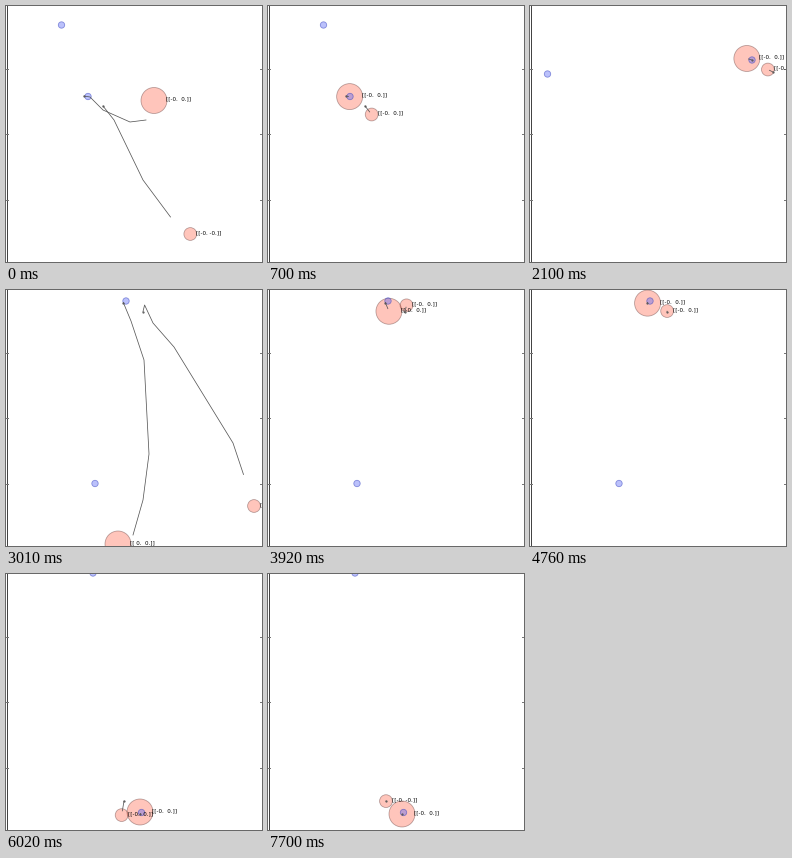
Write a matplotlib script that moves like this. It is 256 px wide and 256 px high and loops after 7.77 s.

```python
import numpy as np
import matplotlib.pyplot as plt
from matplotlib.animation import FuncAnimation
from matplotlib.patches import Circle

SIZE, DPI = 256, 100
FRAMES, INTERVAL = 111, 70
PX = 72 / DPI  # points per pixel
RADII = (13, 6.4)

STARTS = (0, 21, 43, 70)
GOALS = (
    [(55.5, 19), (82, 90.5)],
    [(17.5, 68), (222, 54)],
    [(120, 11), (89, 193.5)],
    [(87, -1), (135.5, 238.5)],
)
# Bends of each episode's path: step, x, y
BIG = (
    [(0, 148, 94.5), (1, 140, 114), (2, 124, 116), (4, 97, 104),
     (6, 84, 91), (8, 78, 90)],
    [(0, 128, 58.5), (1, 154, 51), (3, 195, 46), (6, 222, 54)],
    [(0, 112, 254), (1, 127, 245), (2, 137, 210), (3, 143, 164),
     (5, 138, 70), (7, 125, 31), (9, 117.3, 12.5)],
    [(0, 140, 42), (2, 141.5, 72), (5, 137, 190), (7, 134, 232),
     (9, 134, 240)],
)
SMALL = (
    [(0, 184.3, 228), (1, 164.5, 211), (3, 137, 174), (6, 108, 114),
     (8, 97, 100)],
    [(0, 164.3, 39.3), (1, 183, 42), (3, 216, 53), (6, 243, 66)],
    [(0, 248, 216), (2, 227, 153), (5, 168, 57), (6, 147, 33),
     (8, 138.6, 15), (9, 137, 21.5)],
    [(0, 128, 66), (7, 116, 222), (9, 115, 245), (10, 118, 227)],
)

fig = plt.figure(figsize=(SIZE / DPI, SIZE / DPI), dpi=DPI, facecolor="white")
ax = fig.add_axes([0, 0, 1, 1])
ax.set(xlim=(0, SIZE), ylim=(SIZE, 0))
ax.axis("off")

ax.plot([0.5, 0.5], [0, SIZE], color="#444444", lw=PX)
for y in (62.5, 127.5, 193.5):
    ax.plot([0, 2], [y, y], color="#777777", lw=PX)
    ax.plot([253.5, SIZE], [y, y], color="#777777", lw=PX)


def disc(radius, fill, edge, z):
    return ax.add_patch(Circle((0, 0), radius, facecolor=fill, edgecolor=edge,
                               lw=0.8 * PX, zorder=z))


agents = [disc(r, (1, 0.39, 0.28, 0.37), (0.3, 0.15, 0.15, 0.4), 2)
          for r in RADII]
goals = [disc(3.2, (0.3, 0.36, 0.96, 0.38), (0.2, 0.25, 0.75, 0.55), 3)
         for _ in range(2)]
plans = [ax.plot([], [], color="#555555", lw=0.75 * PX, marker=".",
                 ms=1.6 * PX, markevery=[-1], zorder=4)[0] for _ in RADII]
labels = [ax.text(0, 0, "", fontsize=5.6 * PX, family="DejaVu Sans",
                  va="baseline", zorder=5) for _ in RADII]


def along(path, s):
    k, x, y = zip(*path)
    return np.interp(s, k, x), np.interp(s, k, y)


def action(frame, agent):
    sx = " " if agent == 0 and frame % 9 in (4, 7, 8) else "-"
    sy = "-" if agent == 1 and frame % 11 in (0, 4, 7) else " "
    return f"[[{sx}0. {sy}0.]]"


def draw(frame):
    ep = sum(frame >= t for t in STARTS) - 1
    for goal, spot in zip(goals, GOALS[ep]):
        goal.center = spot
    for i, path in enumerate((BIG[ep], SMALL[ep])):
        last = path[-1][0]
        s = last * np.tanh((frame - STARTS[ep]) / last)
        x, y = along(path, s)
        agents[i].center = (x, y)
        # the plan still ahead, one vertex per step
        ahead = s + min(1, 0.3 * (last - s))
        steps = np.r_[ahead, np.arange(np.floor(ahead) + 1, last + 1)]
        plans[i].set_data(*along(path, steps))
        labels[i].set_position((x + RADII[i] - 0.5, y))
        labels[i].set_text(action(frame, i))
    return agents + goals + plans + labels


anim = FuncAnimation(fig, draw, frames=FRAMES, interval=INTERVAL,
                     repeat=True, repeat_delay=0, blit=False)
plt.show()
```
